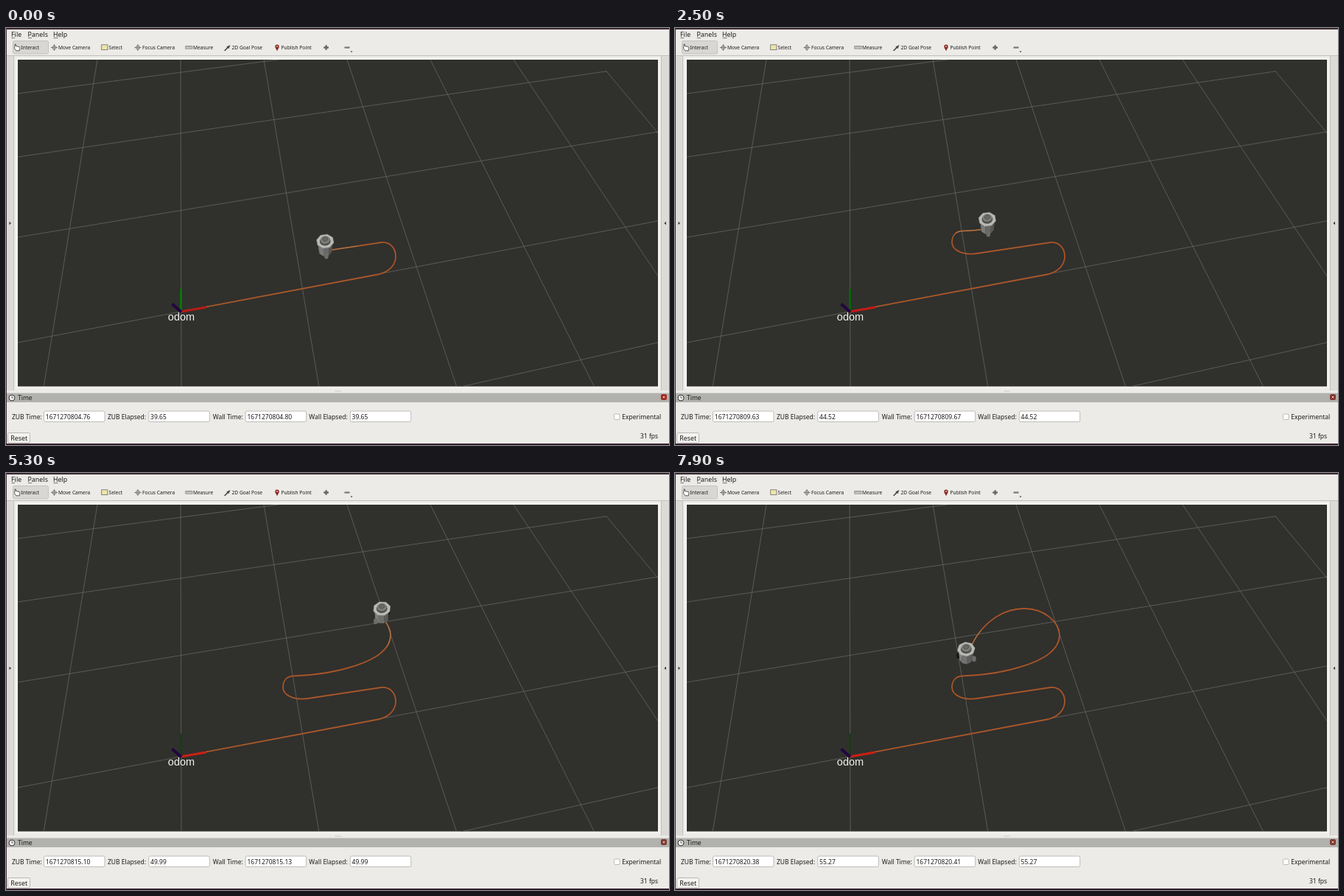
Write an HTML page that moves like this. It is 900 px wide and 566 px high and loops after 8 s.

```html
<!DOCTYPE html>
<html lang="en">
<head>
<meta charset="utf-8">
<title>Robot path view</title>
<style>
html, body { margin: 0; width: 100%; height: 100%; overflow: hidden; background: #ecebe7; }
svg { display: block; width: 900px; height: 566px; font: 8.5px "Noto Sans", "Open Sans", sans-serif; fill: #1c1c1c; }
.menu { font-size: 8.9px; }
.tool { font-size: 6.7px; }
.line { fill: none; stroke: #444; }
.edge { fill: none; stroke: #c2c1bd; }
.cross { fill: none; stroke: #777; }
.box { fill: #fff; stroke: #bdbcb8; }
.trail { fill: none; stroke-linejoin: round; }
#grid { stroke: #656561; stroke-width: .8; }
</style>
</head>
<body>
<svg viewBox="0 0 900 566">
  <defs>
    <clipPath id="view"><rect x="16" y="43" width="869" height="443.5"/></clipPath>
    <g id="cross" class="cross"><circle r="2.6"/><path d="M-4.5 0h9M0-4.5v9"/></g>
  </defs>

  <rect width="900" height="566" fill="#ecebe7"/>
  <rect width="900" height="2" fill="#3b2a33"/>
  <rect y="564" width="900" height="2" fill="#35202e"/>
  <rect width="1" height="566" fill="#4a3341"/>

  <g class="menu">
    <text x="7" y="12">File</text><text x="29.5" y="12">Panels</text><text x="64" y="12">Help</text>
    <path class="line" stroke-width=".7" d="M7.5 13.6h4.5M30 13.6h5M64.5 13.6h6"/>
  </g>

  <rect x="9.5" y="17.5" width="48" height="17.5" rx="2" fill="#d8d7d3" stroke="#c3c2be"/>
  <g class="tool">
    <text x="20.5" y="29">Interact</text><text x="71" y="29">Move Camera</text>
    <text x="139.5" y="29">Select</text><text x="185" y="29">Focus Camera</text>
    <text x="254" y="29">Measure</text><text x="306.5" y="29">2D Goal Pose</text>
    <text x="373.5" y="29">Publish Point</text>
  </g>
  <path d="M12 25v-3h1.3v2.6l4.8.9q1 .3.9 1.4l-.7 3.9h-4.4l-2.7-3.6z" fill="#fff" stroke="#333" stroke-width=".8"/>
  <use href="#cross" x="65.5" y="26.5"/>
  <rect x="129.7" y="22.8" width="8.2" height="6.8" fill="#efe6a8" stroke="#777" stroke-width=".9"/>
  <use href="#cross" x="179" y="26.5"/>
  <rect x="243.8" y="24.7" width="9" height="3.4" fill="#d6d6d1" stroke="#777" stroke-width=".8"/>
  <path d="M245.8 25v1.5M248 25v1.5M250.2 25v1.5" stroke="#666" stroke-width=".6"/>
  <path d="M296 30.5l4.2-4.2-1-.9 5.3-2.4-2 5.2-1-.9-4.1 4z" fill="#454a40"/>
  <path d="M368 31.2c-1-2.5-2.7-4-2.7-6a2.7 2.7 0 0 1 5.4 0c0 2-1.7 3.5-2.7 6z" fill="#8c2822"/>
  <circle cx="368" cy="25" r="1" fill="#e5c9c5"/>
  <path d="M431.3 26.5h6.6M434.6 23.2v6.6" stroke="#666" stroke-width="2.3"/>
  <path d="M459.5 26.5h7" stroke="#777" stroke-width="2.2"/>
  <path d="M467.5 31.5h3l-1.5 1.7z" fill="#333"/>

  <path class="edge" d="M1 37.5h899"/>
  <path d="M1 38h9.5v454H1zM890 38h10v454h-10z" fill="#dcdbd8"/>
  <path class="edge" d="M10.5 38v454M889.5 38v454"/>
  <path d="M4.5 262.8l2.500 2.200-2.500 2.200zM896 262.800l-2.500 2.200 2.500 2.200z" fill="#333"/>
  <rect x="13" y="40" width="875" height="449.5" fill="#f3f2ef"/>
  <rect x="16" y="43" width="869" height="443.5" fill="#30302d"/>

  <g clip-path="url(#view)">
    <g id="grid"></g>
    <path id="green" d="M237.5 385V354" stroke-width="3"/>
    <path id="path" class="trail" stroke="#a64a26" stroke-width="1.8" d="M237 385L505 334.5C521 331 529 321 529 310C529 298 521 290.5 510 291L410 306C390 309 376 301 376 291C376 283 380 276 390 275.5C440 274 522 258 522 220C522 203 502 184 474 184C447 184 425 200 412 218C404 229 399 241 395 253"/>
    <path id="core" class="trail" stroke="#a0742f" stroke-width=".5"/>
    <path id="fresh" class="trail" stroke="#a88c62" stroke-width=".7"/>
    <path id="red" d="M238 385L272 379" stroke-width="3"/>
    <path d="M238 385.5L225.5 374.5" stroke="#220640" stroke-width="4"/>
    <g id="robot"></g>
    <text x="238" y="396.5" text-anchor="middle" fill="#f2f2f2" style="font:14.5px 'Liberation Sans', Arial, sans-serif">odom</text>
  </g>

  <path d="M447 493h8" stroke="#aaa" stroke-dasharray="1 1"/>
  <rect x="1" y="495.5" width="899" height="12.5" fill="#b1b1ae"/>
  <circle cx="8" cy="502" r="4" fill="#f0f0ee" stroke="#333"/>
  <path class="line" stroke-width=".8" d="M8 499.5V502h2"/>
  <text x="16" y="505">Time</text>
  <rect id="close" x="889" y="497" width="8" height="8" rx="2"/>
  <path d="M891.7 499.7l2.600 2.600m0-2.600l-2.600 2.600" stroke="#ecc9c2"/>

  <g id="fields"></g>
  <rect class="box" x="825.5" y="524" width="7.5" height="7.5" rx="1"/>
  <text x="836.3" y="531">Experimental</text>
  <rect x="2.5" y="549.5" width="30" height="13.5" rx="2" fill="#f4f3f0" stroke="#b9b8b4"/>
  <text x="6.2" y="559.5" class="menu">Reset</text>
  <text x="861" y="557">31 fps</text>
</svg>
<script>
const $ = id => document.getElementById(id);
const LOOP = 8000, TICK = 100, CLOCK = 1671270765.11;

// time ms, elapsed s, wall clock lead s, robot ground point
const keys = [
  [0, 39.65, .04, 433, 302.5],
  [1800, 43.11, .03, 390, 275.5],
  [3100, 45.73, .04, 453, 267],
  [4100, 47.65, .04, 508, 246],
  [5300, 49.99, .03, 511, 196],
  [6800, 53.13, .03, 425, 203],
  [7900, 55.27, .03, 395, 253]
];

// Floor grid: both line families meet in their vanishing points
function buildGrid() {
  let out = '';
  const add = (x1, y1, x2, y2) => out += `<path d="M${x1} ${y1}L${x2} ${y2}"/>`;
  for (let c = -1; c <= 5; c++) {
    const top = 237 + 113 * c, slope = (1 + 73.7 * c) / 443;
    const y = c === 5 ? 58 : 43;
    add(top + slope * (y - 43), y, top + slope * 443, 486);
  }
  for (const y of [622, 427, 284, 175, 89]) {
    const end = y === 175 ? 815 : 885;
    add(16, y, end, y - (y + 647) / 5652 * (end - 16));
  }
  $('grid').innerHTML = out;
}

function buildFields() {
  const items = [['ZUB Time:', 8, 51.5], ['ZUB Elapsed:', 138, 193.8], ['Wall Time:', 280.8, 325.2], ['Wall Elapsed:', 411.3, 467.3]];
  $('fields').innerHTML = items.map(([label, x, bx], i) =>
    `<text x="${x}" y="531">${label}</text><rect class="box" x="${bx}" y="520" width="82.5" height="14.5" rx="2"/>
     <text id="v${i}" x="${bx + 2.3}" y="530.5"></text>`).join('');
}

// Screen vectors of one floor metre near the middle of the route
const toScreen = (u, v) => [148 * u - 25 * v, -24 * u - 120 * v];
const toFloor = (dx, dy) => [(120 * dx - 25 * dy) / 18360, (-24 * dx - 148 * dy) / 18360];

const path = $('path'), points = [], travel = [0];
for (const id of ['core', 'fresh']) $(id).setAttribute('d', path.getAttribute('d'));
const total = path.getTotalLength();
for (let s = 0; s <= total; s++) {
  const p = path.getPointAtLength(s);
  points.push(p);
  if (s) {
    const q = points[s - 1];
    travel.push(travel[s - 1] + Math.hypot(...toFloor(p.x - q.x, p.y - q.y)));
  }
}
const stops = keys.map(([, , , x, y]) => {
  let best = 0, least = Infinity;
  points.forEach((p, i) => {
    const d = Math.hypot(p.x - x, p.y - y);
    if (d < least) { least = d; best = i; }
  });
  return travel[best];
});

function lengthAt(dist) {
  const i = travel.findIndex(d => d >= dist);
  if (i < 1) return i < 0 ? points.length - 1 : 0;
  return i - 1 + (dist - travel[i - 1]) / (travel[i] - travel[i - 1]);
}

const poly = (pts, fill, extra = '') =>
  `<polygon points="${pts.map(p => p.map(n => n.toFixed(2)).join()).join(' ')}" fill="${fill}" ${extra}/>`;
const grey = n => `rgb(${n | 0},${n | 0},${n - 2 | 0})`;

function drawRobot(s) {
  const p = path.getPointAtLength(s);
  const a = path.getPointAtLength(Math.max(0, s - 5)), b = path.getPointAtLength(Math.min(total, s + 3));
  const [u, v] = toFloor(b.x - a.x, b.y - a.y), head = Math.atan2(v, u);
  const at = (angle, r, h) => {
    const [x, y] = toScreen(r * Math.cos(angle), r * Math.sin(angle));
    return [p.x + x, p.y + y - h];
  };
  const ring = (r, h, n = 8) => Array.from({ length: n }, (_, k) => at(head + (k + .5) * 2 * Math.PI / n, r, h));

  const wheels = [1, -1].map(side => {
    const [x, y] = at(head + side * Math.PI / 2, .074, 2);
    const near = y > p.y - 2;
    return [near, `<ellipse cx="${x}" cy="${y}" rx="2.8" ry="4" fill="${near ? '#6c6c6a' : '#171716'}"/>`];
  });
  const pick = near => wheels.filter(w => w[0] === near).map(w => w[1]).join('');

  const low = ring(.06, 0), high = ring(.068, 12);
  let sides = poly(low, '#3f3f3d');
  for (let k = 0; k < 8; k++) {
    const j = (k + 1) % 8;
    const nx = (low[k][0] + low[j][0]) / 2 - p.x, ny = (low[k][1] + low[j][1]) / 2 - p.y;
    if (ny > -2) sides += poly([low[k], low[j], high[j], high[k]], grey(108 - 3 * nx));
  }
  const top = poly(ring(.08, 13), '#b9b9b6', 'stroke="#8f8f8c" stroke-width=".5"');
  const sensor = poly(ring(.05, 13, 12), '#50504e') + poly(ring(.044, 15, 12), '#7c7c7a') +
    poly(ring(.026, 16, 6), '#686866', 'stroke="#454543" stroke-width=".6"');
  $('robot').innerHTML = pick(false) + sides + pick(true) + top + sensor;
}

function render(ms) {
  let i = keys.findIndex(k => k[0] > ms) - 1;
  if (i < 0) i = keys.length - 2;
  const k = keys[i], n = keys[i + 1];
  const f = Math.min(1, (ms - k[0]) / (n[0] - k[0]));
  const mix = (a, b) => a + (b - a) * f;

  const elapsed = mix(k[1], n[1]), clock = CLOCK + elapsed;
  const values = [clock, elapsed, clock + mix(k[2], n[2]), elapsed];
  values.forEach((value, j) => $('v' + j).textContent = value.toFixed(2));

  const s = lengthAt(mix(stops[i], stops[i + 1]));
  for (const id of ['path', 'core']) $(id).style.strokeDasharray = `${s} 2000`;
  $('fresh').style.strokeDasharray = `0 ${s - 45} 45 2000`;
  drawRobot(s);

  // The scene refreshes in hard steps
  const phase = ms < 2300 ? 0 : ms < 5000 ? 1 : 2;
  $('green').setAttribute('stroke', ['#087508', '#0a620a', '#1c3a1a'][phase]);
  $('red').setAttribute('stroke', ['#b91a16', '#c51a14', '#cb1f12'][phase]);
  $('close').setAttribute('fill', ['#a32a22', '#85352c', '#7d3a31'][phase]);
}

buildGrid();
buildFields();
const start = performance.now();
let last = -1;
function frame() {
  const ms = Math.floor((performance.now() - start) % LOOP / TICK) * TICK;
  if (ms !== last) render(last = ms);
  requestAnimationFrame(frame);
}
frame();
</script>
</body>
</html>
```
